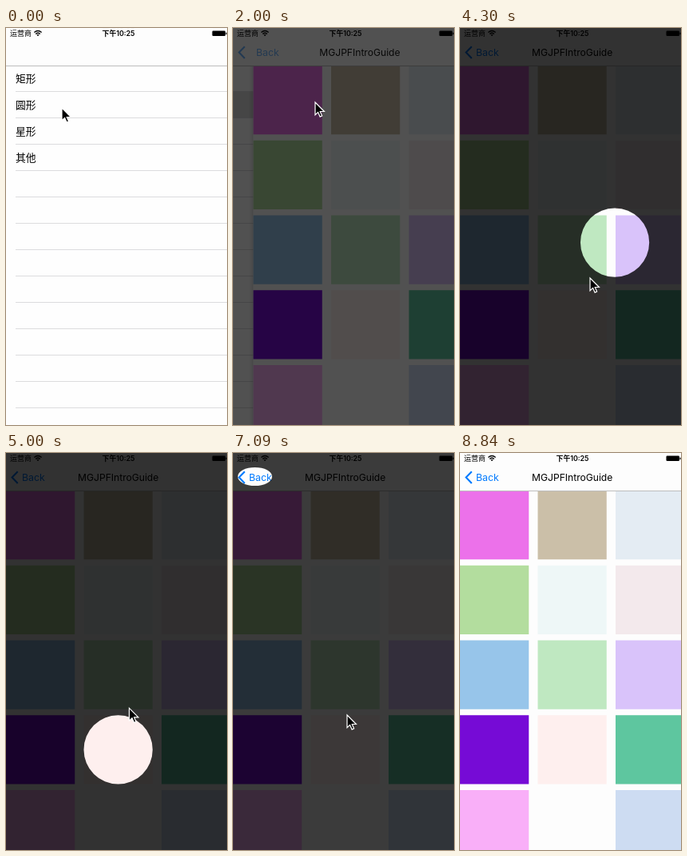
An HTML page for the animation above (9.25 s loop, 277x497 px).

```html
<!DOCTYPE html>
<html lang="zh">
<head>
<meta charset="utf-8">
<style>
html, body { margin: 0; width: 100%; height: 100%; overflow: hidden; background: #fff; }
svg { display: block; }
text { font-family: Inter, "Noto Sans CJK SC", "Noto Sans CJK", sans-serif; }
.cjk { font-family: "Noto Sans CJK SC", "Noto Sans CJK", sans-serif; }
#guide text { stroke: currentColor; stroke-width: .4; stroke-linejoin: round; }
</style>
</head>
<body>
<svg width="277" height="497" viewBox="0 0 277 497">
  <defs>
    <linearGradient id="edge">
      <stop offset="0" stop-color="#000" stop-opacity="0"/>
      <stop offset="1" stop-color="#000" stop-opacity=".12"/>
    </linearGradient>
  </defs>
  <rect width="277" height="497" fill="#fefefe"/>
  <g id="list"></g>
  <g id="page">
    <rect x="-6" y="48" width="6" height="449" fill="url(#edge)"/>
    <rect y="47" width="282" height="450" fill="#fdfdfd"/>
    <g id="cells"></g>
  </g>

  <rect width="277" height="47" fill="#fdfdfd"/>
  <rect y="47" width="277" height="1" fill="#bdbdbd"/>
  <g id="back" fill="#007aff">
    <path d="M14.7 23.3L7.6 30.6L14.7 37.9" fill="none" stroke="#007aff" stroke-width="2.1"/>
    <text id="backLabel" x="20" y="35" font-size="12.3">Back</text>
  </g>
  <text id="title" y="35" font-size="12.1" text-anchor="middle">MGJPFIntroGuide</text>

  <g id="status">
    <text class="cjk" x="5" y="10" font-size="9">运营商</text>
    <path d="M35.4 5.6Q40 1.4 44.6 5.6M37.2 7.5Q40 5 42.8 7.5" fill="none" stroke="#000" stroke-width="1.3"/>
    <path d="M38.4 8.6Q40 7.3 41.6 8.6L40 10.3Z"/>
    <text x="141" y="10" font-size="8.8" font-weight="600" text-anchor="middle">下午10:25</text>
    <rect x="258.5" y="3.5" width="16.5" height="6.5" rx="1.2"/>
    <rect x="275.5" y="5.4" width="1.2" height="2.8" rx=".5"/>
  </g>

  <path id="shade" fill-rule="evenodd"/>
  <g id="guide" fill="currentColor" color="#fff">
    <g transform="translate(52 103) rotate(-2.5)">
      <text class="cjk" font-size="23">这个</text>
      <text class="cjk" x="46.5" y="-.5" font-size="17.6">是你的专属特权</text>
    </g>
    <text class="cjk" transform="translate(70 126) rotate(-2)" font-size="19.4">刷信用，就能买</text>
    <g fill="none" stroke="#fff" stroke-width="1.1" stroke-linecap="round" stroke-linejoin="round">
      <path d="M95.5 75.5q1.5 4 4.5 1.2q2 3 5-1.4"/>
      <path d="M225.5 96l2-12q2.5-3.5 5-.5l-4.5 12zM227.5 86l4 1.5"/>
    </g>
    <circle cx="224.5" cy="102" r=".8"/>
    <g color="#fbce33" fill="currentColor">
      <text class="cjk" transform="translate(84.5 176) rotate(-10.5)" font-size="14.2">看看你的额度</text>
      <circle cx="152" cy="169.5" r=".9"/>
      <circle cx="164.5" cy="166.5" r=".9"/>
      <path d="M130 178.5Q153 198 189 191.5M178 187.5L189.5 191.3L180 198" fill="none"
        stroke="currentColor" stroke-width="1.8" stroke-linecap="round" stroke-linejoin="round"/>
    </g>
  </g>
  <path id="cursor" d="M0 0V15.8L3.6 12.4L6.1 18.1L8.6 17L6.2 11.5H11.4Z" stroke="#fff" stroke-width="1.2"/>
</svg>
<script>
const LOOP = 9250, FADE = 280, GLIDE = 300;
const CELL = 86.25, STEP_X = 97.5, STEP_Y = 93.75, TOP = 47, ROW = 33;

const $ = id => document.getElementById(id);
const add = (parent, tag, attrs, text = '') => {
  const el = document.createElementNS('http://www.w3.org/2000/svg', tag);
  for (const key in attrs) el.setAttribute(key, attrs[key]);
  el.textContent = text;
  parent.append(el);
  return el;
};
const shift = (id, x, y = 0) => $(id).setAttribute('transform', `translate(${x} ${y})`);
const opacity = (id, value) => $(id).setAttribute('opacity', value);

// Table rows and colour grid
const list = $('list');
add(list, 'rect', { id: 'pressed', y: TOP + ROW, width: 277, height: ROW - 1, fill: '#d9d9d9' });
for (let i = 1; i <= 13; i++) {
  add(list, 'rect', { x: 12, y: TOP + ROW * i - 1, width: 265, height: 1, fill: '#dcdcde' });
}
['矩形', '圆形', '星形', '其他'].forEach((label, i) =>
  add(list, 'text', { class: 'cjk', x: 12, y: 68 + ROW * i, 'font-size': 12.8 }, label));

const colors = [
  '#ec71ea', '#cbbfa8', '#e4ecf3', '#b3dd9e', '#eef7f7', '#f3e9ec', '#97c5ea', '#bfe8c1',
  '#d9c3fa', '#760bd6', '#feefee', '#5ec69f', '#f9aff8', '#fdfdfd', '#cddcf2'
];
colors.forEach((fill, i) => add($('cells'), 'rect', {
  x: STEP_X * (i % 3), y: TOP + STEP_Y * Math.floor(i / 3), width: CELL, height: CELL, fill
}));

const clamp = v => Math.max(0, Math.min(1, v));
const smooth = v => v * v * (3 - 2 * v);
const easeOut = v => 1 - (1 - v) ** 3;
const fade = (t, start) => smooth(clamp((t - start) / FADE));
const mix = (a, b, p) => a.map((v, i) => v + (b[i] - v) * p);

// Spotlight as cx, cy, rx, ry
const onCell = (col, row) =>
  [STEP_X * col + CELL / 2, TOP + STEP_Y * row + CELL / 2, CELL / 2, CELL / 2];
const spots = [
  { at: 2150, to: onCell(2, 1) },
  { at: 4170, to: onCell(1, 3) },
  { at: 5340, to: [141, 31, 51, 8] },
  { at: 5980, to: [27.5, 29.5, 21.5, 11.5] }
];
const spotAt = t => {
  const [cx, cy] = spots[0].to;
  return spots.reduce((spot, { at, to }) => mix(spot, to, fade(t, at)), [cx, cy, 0, 0]);
};

// Each glide sets off at a time towards a point
const glides = [
  { at: 120, to: [76, 98] }, { at: 650, to: [82, 128] }, { at: 1100, to: [103, 93] },
  { at: 2340, to: [134, 136] }, { at: 2930, to: [189, 287] }, { at: 3950, to: [163, 313] },
  { at: 4950, to: [143, 328] }, { at: 7760, to: [77, 76] }, { at: 8300, to: [236, 500] }
];
const pointerAt = t => glides.reduce(
  (point, { at, to }) => mix(point, to, easeOut(clamp((t - at) / GLIDE))), [70, 100]);

// Critically damped spring
const push = t => {
  const s = Math.max(0, t - 1800) / 50;
  return 1 - (1 + s) * Math.exp(-s);
};

function draw(t) {
  const p = push(t), rest = 1 - p;
  shift('list', -83 * p);
  opacity('pressed', t > 1800 ? 1 : 0);
  shift('page', 283 * rest);
  shift('title', 140.7 + 202 * rest);
  shift('backLabel', 100 * rest);
  opacity('back', p ** 6);
  opacity('title', p);

  const [cx, cy, rx, ry] = spotAt(t);
  const arc = dx => `a${rx} ${ry} 0 1 0 ${dx} 0`;
  $('shade').setAttribute('d', 'M0 0H277V497H0Z' +
    (rx ? `M${cx - rx} ${cy}${arc(2 * rx)}${arc(-2 * rx)}Z` : ''));
  opacity('shade', 0.8 * fade(t, 1790) * (1 - fade(t, 7055)));
  opacity('guide', t < spots[1].at ? fade(t, spots[0].at) : 0);
  shift('cursor', ...pointerAt(t));
}

function tick(now) {
  draw(now % LOOP);
  requestAnimationFrame(tick);
}
tick(0);
</script>
</body>
</html>
```
